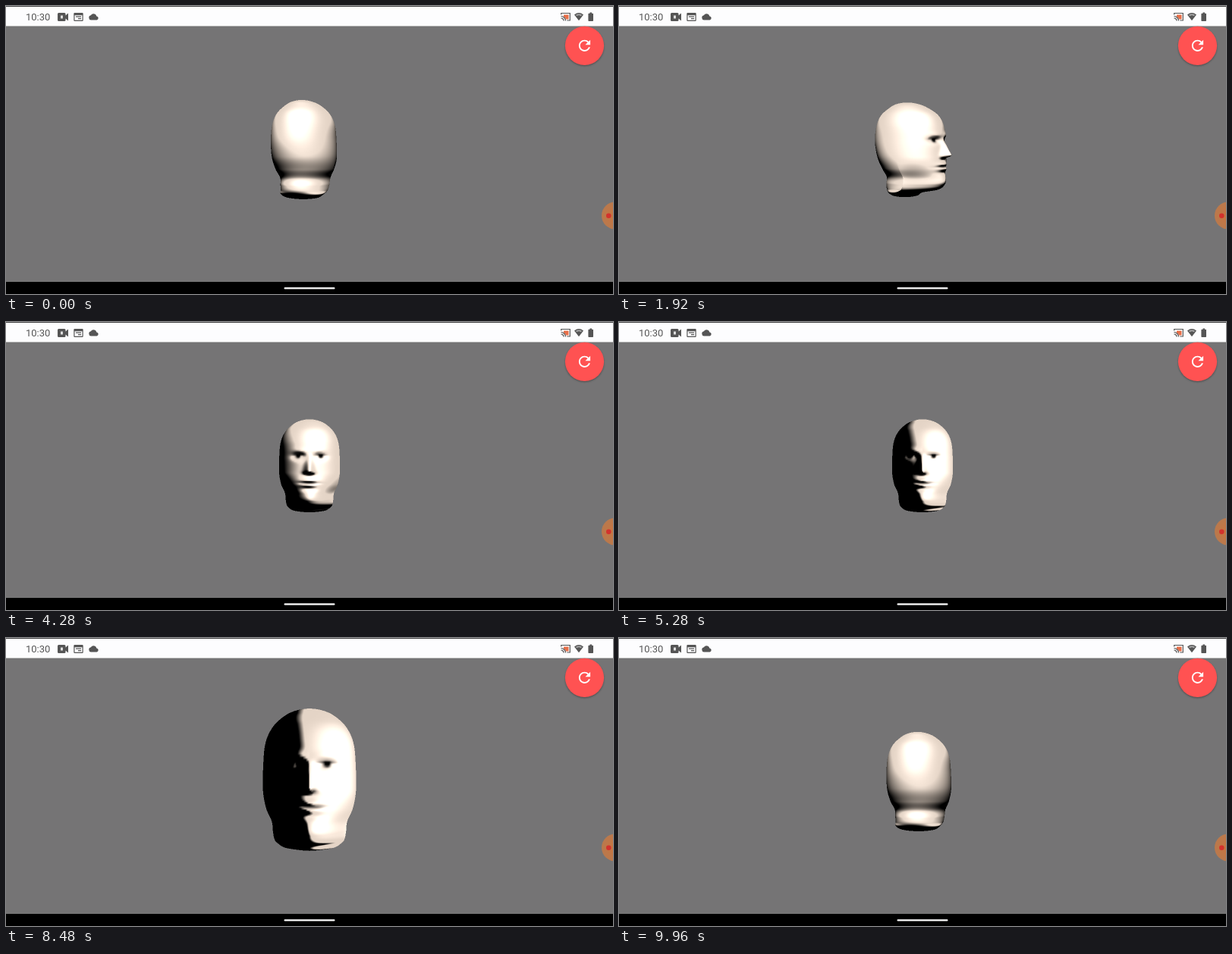
Write an HTML page with a canvas that moves like this. It is 800 by 380 pixels and loops after 10 s.

```html
<!DOCTYPE html>
<html lang="en">
<head>
<meta charset="utf-8">
<title>Turning head</title>
<style>
html, body { margin: 0; width: 800px; height: 380px; overflow: hidden; background: #757475; }
svg, canvas { position: absolute; display: block; }
svg { left: 0; top: 0; }
canvas { left: 310px; top: 55px; width: 180px; height: 260px; }
text { font: 13px Roboto, Arial, sans-serif; fill: #555; }
</style>
</head>
<body>
<svg width="800" height="380" viewBox="0 0 800 380">
  <defs>
    <radialGradient id="bubble"><stop offset="0" stop-color="#c9743f"/><stop offset="1" stop-color="#b9794d"/></radialGradient>
    <filter id="soft" x="-20%" y="-20%" width="140%" height="140%"><feGaussianBlur stdDeviation="1.2"/></filter>
  </defs>
  <rect width="800" height="380" fill="#757475"/>
  <rect width="800" height="26.5" fill="#fdfdfe"/>
  <rect width="800" height="1" fill="#444"/>
  <text x="26" y="19">10:30</text>
  <g fill="#555">
    <path d="M69.500 9h7.500q1.500 0 1.500 1.500v2l3.500-3v10l-3.500-3v2q0 1.500-1.500 1.500h-7.500q-1.500 0-1.500-1.500v-8q0-1.500 1.500-1.500z"/>
    <path d="M72 12.500h3v4h-3z" fill="#ddd"/>
    <path d="M90.500 9h10q1.200 0 1.200 1.200v8.600q0 1.200-1.200 1.200h-10q-1.200 0-1.200-1.200v-8.600q0-1.200 1.200-1.200zm0 3.200v6.500h10v-6.500zm1.500 1.300h7v1.300h-7zm3 2.500h4v1.300h-4z"/>
    <path d="M112 18.500a3.200 3.200 0 0 1-.2-6.300a4.200 4.200 0 0 1 7.600 1.200a2.600 2.600 0 0 1 .3 5.100z"/>
    <path d="M749 11.500q6-4.800 12 0l-6 7.800z"/>
    <path d="M751 11.700q4-2.300 8 0l-1.200 1.500q-2.800-1.700-5.600 0z" fill="#aaa"/>
    <path d="M769.500 8.500h2.500v1.200h1.200q.8 0 .8.800v8.700q0 .8-.8.800h-5q-.8 0-.8-.8v-8.700q0-.8.800-.8h1.300z"/>
  </g>
  <path d="M735 11.500h6.500v6h-3.500q-.5-2.500-3-3z" fill="#e8704a"/>
  <path d="M731.700 11.500v-2h11.600v9.500h-4M731.500 13.500a6 6 0 0 1 6 6M731.500 16a3.500 3.500 0 0 1 3.500 3.500" fill="none" stroke="#555" stroke-width="1.200"/>
  <circle cx="762.500" cy="53.800" r="25.500" fill="#333" opacity=".55" filter="url(#soft)"/>
  <circle cx="762.500" cy="52.300" r="25.600" fill="#ff5252"/>
  <path transform="translate(751.100 40.900) scale(.95)" fill="#fff" d="M17.650 6.350C16.200 4.900 14.210 4 12 4c-4.420 0-7.990 3.580-7.990 8s3.570 8 7.990 8c3.730 0 6.840-2.550 7.730-6h-2.080c-.82 2.330-3.040 4-5.650 4-3.310 0-6-2.690-6-6s2.690-6 6-6c1.660 0 3.140.69 4.220 1.780L13 11h7V4z"/>
  <circle cx="803" cy="276.500" r="18" fill="url(#bubble)"/>
  <circle cx="794.300" cy="276.700" r="3.300" fill="#d2322d"/>
  <rect y="364" width="800" height="16" fill="#000"/>
  <rect x="366.500" y="371.300" width="67" height="2.200" rx="1.100" fill="#fff"/>
</svg>
<canvas width="360" height="520"></canvas>
<script>
const LOOP = 10000, STEP = 40, RESET = 9520;
const COLS = 190, ROWS = 160, CAMERA = 750, SIZE = 1.025;
const canvas = document.querySelector('canvas');
const ctx = canvas.getContext('2d');
const W = canvas.width, H = canvas.height;
const image = ctx.createImageData(W, H);
const pixels = new Uint32Array(image.data.buffer);
const depth = new Float32Array(W * H);

const clamp = (v, lo = 0, hi = 1) => Math.max(lo, Math.min(hi, v));
const smooth = v => { v = clamp(v); return v * v * (3 - 2 * v); };
const bell = (v, width) => Math.exp(-(v * v) / (width * width));

// Head outline from crown to neck: height, half width, back, front.
const outline = [
  [-67, 0, -24, -24], [-65, 12, -38, -9], [-60, 22, -47, 4], [-50, 32, -59, 19],
  [-36, 38, -65, 27], [-16, 39.8, -67, 30], [4, 39.8, -63, 30], [19, 37, -56, 31],
  [30, 32, -50, 31], [39, 31, -51, 30], [45.5, 30, -50, 22], [50, 28, -46, -2],
  [54.5, 20, -39, -10], [56.500, 0, -24, -24]
];
const mirror = ([y, w, b, f]) => [y, -w, f, b];
const knots = [mirror(outline[1]), ...outline, mirror(outline.at(-2))];

function ring(v) {
  const s = clamp(v, 0.0008, 0.9992) * (outline.length - 1);
  const i = Math.floor(s), t = s - i;
  return knots[i].map((a, c) => {
    const b = knots[i + 1][c], d = knots[i + 2][c], e = knots[i + 3][c];
    return b + t / 2 * (d - a + t * (2 * a - 5 * b + 4 * d - e + t * (3 * (b - d) + e - a)));
  });
}

function features(x, y) {
  const ax = Math.abs(x);
  const slope = clamp((y + 20) / 22);
  const nose = 12.5 * slope ** 1.2 * (1 - smooth((y - 2) / 5)) * bell(x, 3.6 + 2.2 * slope);
  const socket = -5 * bell(ax - 13.5, 8) * bell(y + 17, 4);
  const eyeball = 2.6 * bell(ax - 14, 4) * bell(y + 16.5, 2.6);
  const brow = 1.2 * bell(ax - 12, 9) * bell(y + 23, 4);
  const lips = bell(x, 10) * (2.2 * bell(y - 13.5, 3) + 2.4 * bell(y - 19, 2.6) - 3 * bell(y - 16.3, 1.4));
  const chin = bell(x, 10) * (2 * bell(y - 34, 7) - 1.5 * bell(y - 24, 3));
  return nose + socket + eyeball + brow + lips + chin;
}

function paint(x, y) {
  const ax = Math.abs(x);
  const pupil = bell(ax - 14, 2.8) * bell(y + 16.7, 2.2);
  const lid = 0.65 * bell(ax - 13.5, 6.5) * bell(y + 18.7, 1.2);
  const mouth = 0.7 * bell(x, 11) * bell(y - 16.3, 1);
  const nostril = 0.7 * bell(ax - 3, 2.2) * bell(y - 4.5, 1.4);
  return 1 - clamp(1.2 * pupil + lid + mouth + nostril);
}

const COUNT = COLS * (ROWS + 1);
const points = new Float32Array(COUNT * 3), normals = new Float32Array(COUNT * 3);
const albedo = new Float32Array(COUNT);
const at = (row, col) => row * COLS + (col + COLS) % COLS;

function buildHead() {
  for (let r = 0; r <= ROWS; r++) {
    const [y, w, back, front] = ring(r / ROWS);
    const mid = (back + front) / 2, half = (front - back) / 2;
    const taper = 1 + 1.4 * smooth((y - 4) / 40);
    for (let c = 0; c < COLS; c++) {
      const turn = c / COLS * 2 * Math.PI;
      const angle = turn - 0.55 * Math.sin(turn);
      const x = w * Math.sin(angle), cos = Math.cos(angle);
      const i = at(r, c), facing = smooth(cos * 3);
      const z = mid + half * (cos > 0 ? cos ** taper : cos) + (facing && facing * features(x, y));
      points.set([x * SIZE, y * SIZE, z * SIZE], i * 3);
      albedo[i] = facing ? 1 - facing * (1 - paint(x, y)) : 1;
    }
  }
  const diff = (a, b) => [0, 1, 2].map(k => points[a * 3 + k] - points[b * 3 + k]);
  for (let r = 0; r <= ROWS; r++) for (let c = 0; c < COLS; c++) {
    const u = diff(at(r, c + 1), at(r, c - 1));
    const v = diff(at(Math.min(r + 1, ROWS), c), at(Math.max(r - 1, 0), c));
    const n = [u[1] * v[2] - u[2] * v[1], u[2] * v[0] - u[0] * v[2], u[0] * v[1] - u[1] * v[0]];
    const len = Math.hypot(...n) || 1;
    normals.set(n.map(k => k / len), at(r, c) * 3);
  }
}

const sx = new Float32Array(COUNT), sy = new Float32Array(COUNT), sz = new Float32Array(COUNT);
const diffuse = new Float32Array(COUNT), shine = new Float32Array(COUNT);

function project(yaw, lightX, zoom) {
  const cos = Math.cos(yaw), sin = Math.sin(yaw);
  const len = Math.hypot(lightX, 1, 1);
  const half = [lightX / len, -1 / len, 1 / len + 1];
  const halfLen = Math.hypot(...half);
  for (let i = 0; i < COUNT; i++) {
    const j = i * 3, x = points[j], y = points[j + 1], z = points[j + 2];
    const depthZ = (z * cos - x * sin) * zoom;
    const scale = 2 * zoom * CAMERA / (CAMERA - depthZ);
    sx[i] = W / 2 + (x * cos + z * sin) * scale;
    sy[i] = 280 + y * scale;
    sz[i] = depthZ;
    const nx = normals[j] * cos + normals[j + 2] * sin;
    const ny = normals[j + 1];
    const nz = normals[j + 2] * cos - normals[j] * sin;
    const lit = lightX * nx - ny + nz;
    diffuse[i] = clamp(1.4 * lit) * albedo[i];
    const gloss = Math.max(0, (nx * half[0] + ny * half[1] + nz * half[2]) / halfLen);
    shine[i] = 0.4 * gloss ** 8 * clamp(lit * 2) * albedo[i];
  }
}

function triangle(a, b, c) {
  const ax = sx[a], ay = sy[a], bx = sx[b], by = sy[b], cx = sx[c], cy = sy[c];
  const area = (bx - ax) * (cy - ay) - (cx - ax) * (by - ay);
  if (!area) return;
  const x0 = Math.max(0, Math.ceil(Math.min(ax, bx, cx) - 0.5));
  const x1 = Math.min(W - 1, Math.floor(Math.max(ax, bx, cx) - 0.5));
  const y0 = Math.max(0, Math.ceil(Math.min(ay, by, cy) - 0.5));
  const y1 = Math.min(H - 1, Math.floor(Math.max(ay, by, cy) - 0.5));
  for (let y = y0; y <= y1; y++) for (let x = x0; x <= x1; x++) {
    const px = x + 0.5, py = y + 0.5;
    const wb = ((px - ax) * (cy - ay) - (cx - ax) * (py - ay)) / area;
    const wc = ((bx - ax) * (py - ay) - (px - ax) * (by - ay)) / area;
    const wa = 1 - wb - wc;
    if (wa < -1e-4 || wb < -1e-4 || wc < -1e-4) continue;
    const z = wa * sz[a] + wb * sz[b] + wc * sz[c], k = y * W + x;
    if (z <= depth[k]) continue;
    depth[k] = z;
    const d = wa * diffuse[a] + wb * diffuse[b] + wc * diffuse[c];
    const s = 255 * (wa * shine[a] + wb * shine[b] + wc * shine[c]);
    const red = Math.min(255, 228 * d + s), green = Math.min(255, 212 * d + s), blue = Math.min(255, 198 * d + s);
    pixels[k] = 0xff000000 | blue << 16 | green << 8 | red;
  }
}

function draw(t) {
  let yaw = 0, light = 0, zoom = 1;
  if (t < 3080) yaw = 158 * (1 - t / 3080);
  else if (t >= RESET) yaw = 180 - 14 * (t - RESET) / 440;
  else {
    light = 5 * clamp((t - 3920) / 2800);
    zoom = 1 + 0.4 * Math.max(0, t - 7110) / 1000;
  }
  project(yaw * Math.PI / 180, light, zoom);
  pixels.fill(0);
  depth.fill(-1e9);
  for (let r = 0; r < ROWS; r++) for (let c = 0; c < COLS; c++) {
    const a = at(r, c), b = at(r, c + 1), d = at(r + 1, c), e = at(r + 1, c + 1);
    triangle(a, b, d);
    triangle(b, e, d);
  }
  ctx.putImageData(image, 0, 0);
}

buildHead();
const start = performance.now();
let shown = -1;
function tick() {
  const now = (performance.now() - start) % LOOP;
  const t = Math.floor(now / STEP) * STEP;
  if (t !== shown) draw(shown = t);
  requestAnimationFrame(tick);
}
tick();
</script>
</body>
</html>
```
